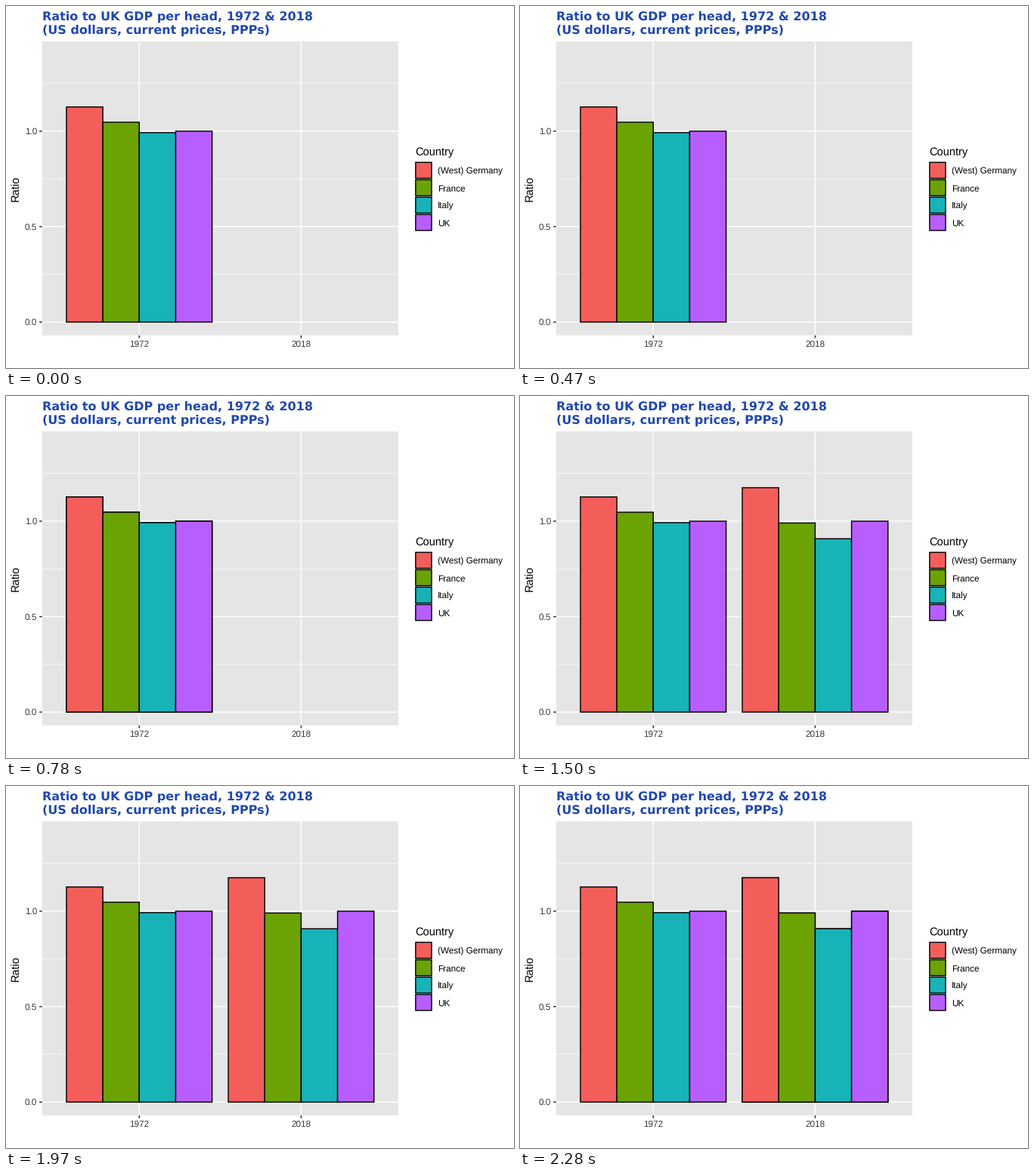
A matplotlib script for the animation above (3 s loop, 672 by 480 pixels).

```python
import matplotlib.pyplot as plt
from matplotlib.animation import FuncAnimation
from matplotlib.patches import Rectangle

W, H, DPI = 672, 480, 96
STEP, FRAMES = 60, 50            # ms per frame, frames per loop
LINE = 1.067                     # points

LEFT, RIGHT, TOP, BOTTOM = 47.8, 518.9, 47, 436.7
ZERO, UNIT = 419.1, 253.1        # pixel row of 0, pixels per 1.0
GROUP = (RIGHT - LEFT) / 2.2
BAR = GROUP * 0.9 / 4

COUNTRIES = ["(West) Germany", "France", "Italy", "UK"]
COLORS = ["#F35E5A", "#6BA204", "#17B3B7", "#B85EFF"]
RATIOS = {"1972": [1.127, 1.047, 0.9925, 1.0],
          "2018": [1.1755, 0.9905, 0.908, 1.0]}

# (start ms, layers of 1972 bars, layers of 2018 bars)
PHASES = [(0, 1, 0), (780, 2, 0), (1500, 1, 1), (2280, 1, 2)]

plt.rcParams["font.family"] = "Liberation Sans"
plt.rcParams["text.hinting"] = "none"

fig = plt.figure(figsize=(W / DPI, H / DPI), dpi=DPI, facecolor="white")
ax = fig.add_axes([0, 0, 1, 1])
ax.set_xlim(0, W)
ax.set_ylim(H, 0)
ax.axis("off")


def row(value):
    return ZERO - value * UNIT


def center(i):
    return LEFT + GROUP * (0.6 + i)


def line(x0, y0, x1, y1, color="white", width=LINE, z=1):
    ax.plot([x0, x1], [y0, y1], color=color, lw=width, zorder=z,
            solid_capstyle="butt", snap=False)


def box(x, y, w, h, fill, edge="black", z=3):
    return ax.add_patch(Rectangle((x, y), w, h, fc=fill, ec=edge, lw=LINE,
                                  joinstyle="miter", zorder=z, snap=False))


def text(x, y, s, size, color="black", **kw):
    ax.text(x, y, s, size=size, color=color, va="baseline", **kw)


def draw_panel():
    ax.add_patch(Rectangle((LEFT, TOP), RIGHT - LEFT, BOTTOM - TOP,
                           fc="#E5E5E5", lw=0, zorder=0, snap=False))
    for v in (0.25, 0.75, 1.25):
        line(LEFT, row(v), RIGHT, row(v), width=LINE / 2)
    for v in (0, 0.5, 1):
        y = row(v)
        line(LEFT, y, RIGHT, y)
        line(LEFT - 3.67, y, LEFT, y, "#272727")
        text(41.2, round(y + 4.2), f"{v:.1f}", 8.8, "#3C3C3C", ha="right")
    for i, year in enumerate(RATIOS):
        x = center(i)
        line(x, TOP, x, BOTTOM)
        line(x, BOTTOM, x, BOTTOM + 3.67, "#272727")
        text(x, 452, year, 8.8, "#3C3C3C", ha="center")


def draw_labels():
    title = dict(family="DejaVu Sans", weight="bold")
    text(LEFT, 19, "Ratio to UK GDP per head, 1972 & 2018", 12, "#2148AE", **title)
    text(LEFT, 37, "(US dollars, current prices, PPPs)", 12, "#2148AE", **title)
    text(18, (TOP + BOTTOM) / 2, "Ratio", 11, ha="center",
         rotation=90, rotation_mode="anchor")
    text(540.9, 198, "Country", 11)
    for i, (name, color) in enumerate(zip(COUNTRIES, COLORS)):
        y = 217.9 + 23.04 * i
        ax.add_patch(Rectangle((540.9, y - 11.52), 23.04, 23.04,
                               fc="#EFEFEF", lw=0, zorder=1, snap=False))
        box(541.85, y - 10.57, 21.15, 21.15, color)
        text(571.3, round(y + 5), name, 8.8)


def make_bars(i, year, layer):
    x0 = center(i) - 2 * BAR
    return [box(x0 + k * BAR, row(v), BAR, v * UNIT, COLORS[k], z=3 + layer)
            for k, v in enumerate(RATIOS[year])]


draw_panel()
draw_labels()
# A second opaque layer darkens the soft edges of the outlines.
bars = [[make_bars(i, year, layer) for layer in range(2)]
        for i, year in enumerate(RATIOS)]


def update(frame):
    now = frame * STEP
    counts = [p for p in PHASES if p[0] <= now][-1][1:]
    for layers, count in zip(bars, counts):
        for n, group in enumerate(layers):
            for bar in group:
                bar.set_visible(n < count)
    return []


anim = FuncAnimation(fig, update, frames=FRAMES, interval=STEP,
                     init_func=lambda: update(0), repeat=True, repeat_delay=0)
plt.show()
```
